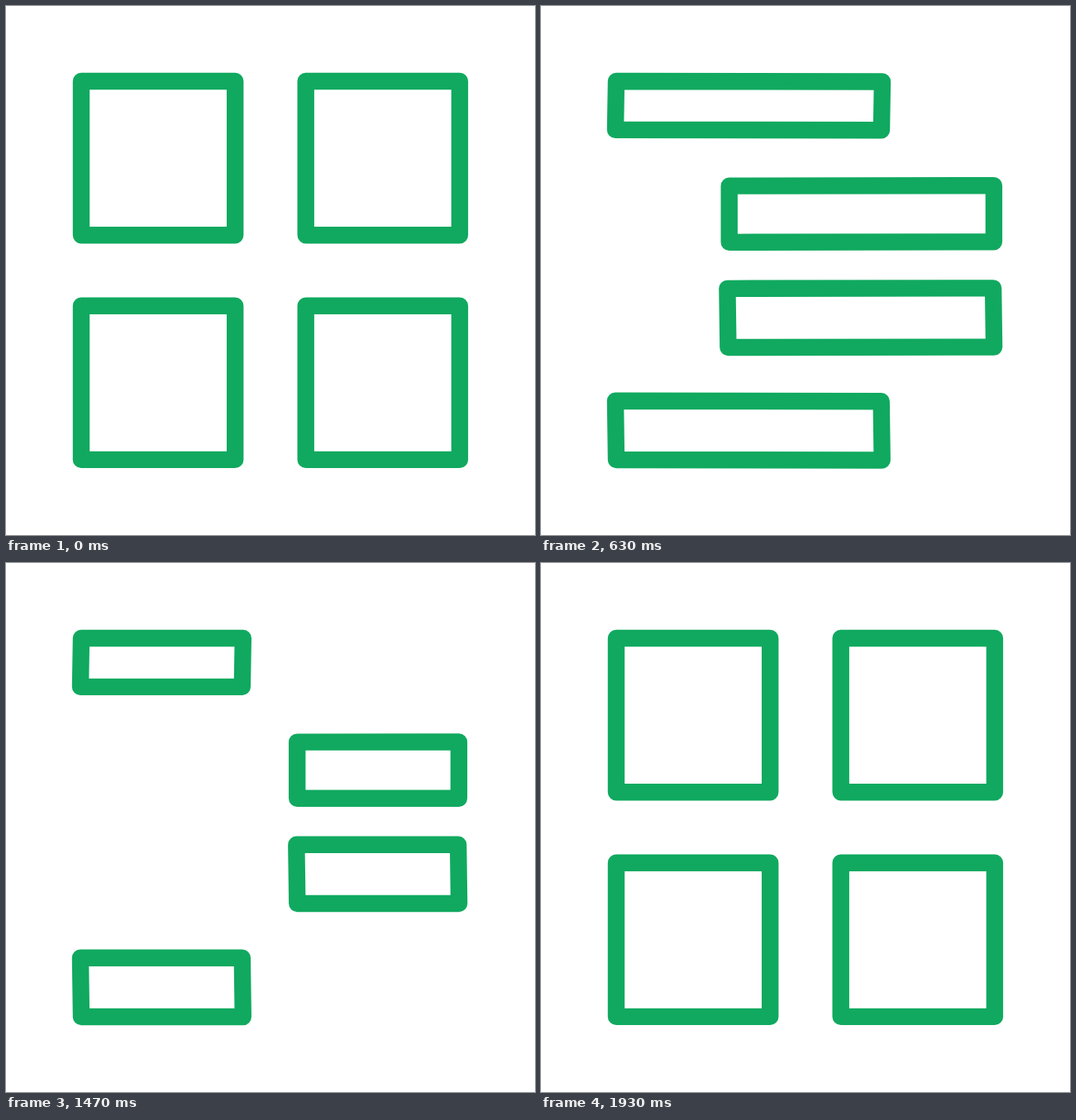
An HTML page that plays this animation: 640 by 640 pixels, repeating every 2 s.

```html
<!DOCTYPE html>
<html>
<head>
<meta charset="utf-8">
<style>
html, body { margin: 0; width: 100%; height: 100%; overflow: hidden; background: #fff; }
svg { display: block; width: 100%; height: 100%; }
polygon { fill: none; stroke: #10a95f; stroke-width: 20.4; stroke-linejoin: round; }
</style>
</head>
<body>
<svg viewBox="0 0 640 640"></svg>
<script>
const near = 91, far = 362.7, size = 186.2;

// Flattened top and bottom, sideways lean of each, and reach when wide
const boxes = [
  { x: near, y: near, flatY: [91, 149.8], lean: [0, -1], reach: 271.5 },
  { x: far, y: near, flatY: [216.5, 284.7], lean: [-1, -1], reach: 268 },
  { x: far, y: far, flatY: [340.7, 411.9], lean: [-1.8, -0.8], reach: 271 },
  { x: near, y: far, flatY: [477.7, 549], lean: [-1, 0], reach: 271 }
];
const corners = [[0, 0], [1, 0], [1, 1], [0, 1]]; // right side?, bottom side?

const svg = document.querySelector("svg");
for (const box of boxes) {
  box.shape = document.createElementNS(svg.namespaceURI, "polygon");
  svg.append(box.shape);
}

const mix = (a, b, t) => a + (b - a) * t;

function ease(t, from, to) {
  const u = Math.min(1, Math.max(0, (t - from) / (to - from)));
  return u * u * (3 - 2 * u);
}

function outline({ x, y, flatY, lean, reach }, flat, wide) {
  const onRight = x === far;
  return corners.map(([right, bottom]) => {
    const moves = onRight ? !right : right; // the edge facing the empty side
    const stretch = moves ? (onRight ? -reach : reach) : 0;
    const sink = (moves ? 1 : 0) + (onRight ? 1.3 : 0);
    return [
      x + right * size + lean[bottom] * flat + stretch * wide,
      mix(y + bottom * size, flatY[bottom], flat) + sink * wide
    ];
  });
}

function draw(now) {
  // The motion advances in steps at 30 per second
  const step = Math.floor((now % 2000 + 3.4) * 0.03);
  const flat = ease(step, 0, 11.7) - ease(step, 45.4, 57.9);
  const wide = ease(step, 12, 26) - ease(step, 33, 45.4);
  for (const box of boxes) {
    box.shape.setAttribute("points", outline(box, flat, wide).join(" "));
  }
}

let start;
function tick(now) {
  start ??= now;
  draw(now - start);
  requestAnimationFrame(tick);
}
draw(0);
requestAnimationFrame(tick);
</script>
</body>
</html>
```
